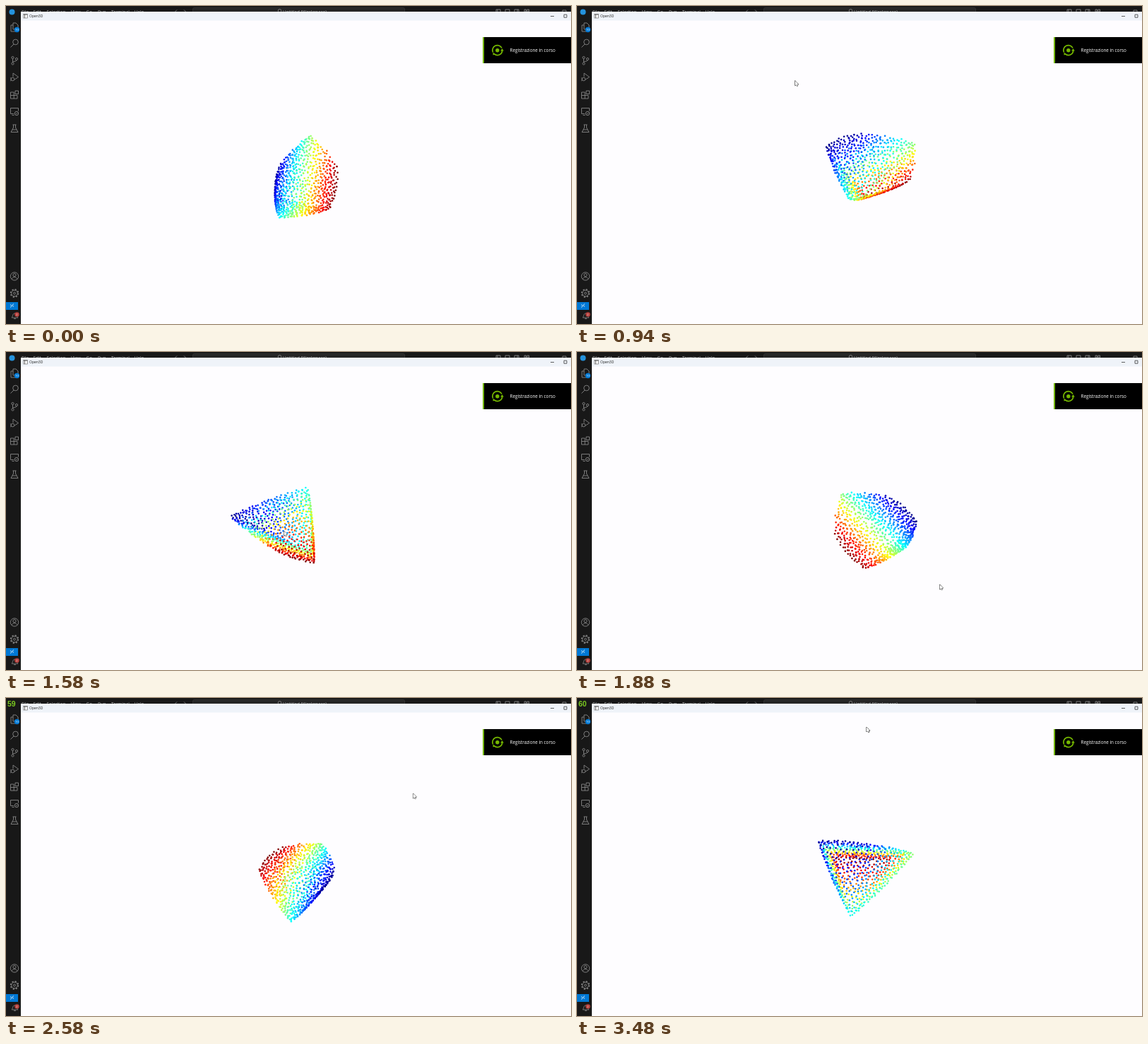
These frames come from a looping animation (800 by 450 pixels, 3.51 s). An HTML page with a canvas:

```html
<!DOCTYPE html>
<html lang="it">
<head>
<meta charset="utf-8">
<title>Open3D</title>
<style>
html, body { margin: 0; width: 100%; height: 100%; overflow: hidden; background: #181818; }
svg, canvas { position: absolute; left: 0; top: 0; width: 800px; height: 450px; }
text { font-family: "Open Sans", "Noto Sans", sans-serif; }
.menu { font-size: 6.4px; fill: #b4b4b4; }
.line { fill: none; stroke: #868686; stroke-width: .9; }
#fps { font: bold 10.5px "Liberation Sans", Arial, sans-serif; fill: #7ac820; }
</style>
</head>
<body>
<svg viewBox="0 0 800 450">
  <rect width="800" height="450" fill="#181818"/>
  <g class="menu">
    <text x="22" y="10.7">File</text><text x="38.5" y="10.7">Edit</text>
    <text x="57.5" y="10.7">Selection</text><text x="92" y="10.7">View</text>
    <text x="113.5" y="10.7">Go</text><text x="130" y="10.7">Run</text>
    <text x="149" y="10.7">Terminal</text><text x="181.5" y="10.7">Help</text>
  </g>
  <path class="line" d="M242 5.5l-3 3h5M252 5.5l3 3h-5"/>
  <rect x="264.5" y="2.5" width="300" height="11" rx="2" fill="#252525" stroke="#3b3b3b" stroke-width=".7"/>
  <circle class="line" cx="387.5" cy="6.8" r="2.3"/>
  <text class="menu" x="392" y="10.7">Untitled (Workspace)</text>
  <path class="line" d="M694 5h6v7h-6zM696 5v7M707 5h6v7h-6zM720 5h6v7h-6zM724 5v7M734 5h2.5v3h-2.5zM738 5h2.5v3h-2.5zM769 9h5M788 6h5v5h-5z"/>
  <circle id="logo" cx="8.5" cy="8.5" r="4" fill="#2492dc"/>
  <text id="fps" x="2" y="12"></text>

  <g class="line">
    <path d="M10 24h4l3 3v6h-7zM10 27h-3v9h7v-3"/>
    <circle cx="13.5" cy="51" r="3.8"/><path d="M11 54l-4.5 4.5"/>
    <circle cx="9.5" cy="73" r="1.6"/><circle cx="9.5" cy="81.5" r="1.6"/><circle cx="15" cy="75" r="1.6"/>
    <path d="M9.5 74.6v5.3M15 76.6c0 2.5-5.5 1-5.5 3.3"/>
    <path d="M10 100v-5l7.5 5.5-6 4"/><circle cx="9.5" cy="103.5" r="2.3"/><path d="M6 101.5l1.5 1M6 106l1.5-1M6 103.8h1.2"/>
    <path d="M6.5 122h4.7v9H6.5zM11.2 126.5H16v4.5h-4.8M6.5 126.5h4.7M13 120h4.5v4.5H13z"/>
    <path d="M11 152.5H6.5v-8h11v4M8.5 154.5h3"/><circle cx="15" cy="152" r="2.7"/><path d="M13.8 152l.9.9 1.5-1.8"/>
    <path d="M9.5 168h5M10.5 168v4L7 178.5h10l-3.5-6.5v-4M9 175h6"/>
    <circle cx="12" cy="382.5" r="5.7"/><circle cx="12" cy="380.7" r="2.1"/><path d="M8.2 386.7c.8-4 6.8-4 7.6 0"/>
    <circle cx="12" cy="406.5" r="4.3"/><circle cx="12" cy="406.5" r="1.5"/>
    <circle cx="12" cy="406.5" r="5.4" stroke-width="1.6" stroke-dasharray="2.12"/>
    <path d="M8 441c2-1.5 1-6 4.5-6s2.5 4.5 4.5 6zM11 442.5h3"/>
  </g>
  <circle cx="15.5" cy="33.5" r="3.7" fill="#0078d4"/>
  <text x="15.5" y="35.1" font-size="4.3" text-anchor="middle" fill="#fff">10</text>
  <rect y="419" width="17" height="11" fill="#0078d4"/>
  <path d="M6 422.5l2.3 2-2.3 2M11 421.5l-2.3 2 2.3 2" fill="none" stroke="#fff" stroke-width=".8"/>
  <circle cx="15.5" cy="436.5" r="3.3" fill="#b5403c"/>
  <text x="15.5" y="438" font-size="4" text-anchor="middle" fill="#fff">2</text>

  <rect x="21" y="8" width="779" height="442" fill="#fefdff"/>
  <rect x="21" y="8" width="779" height="12.5" fill="#eff3f9"/>
  <rect x="24.8" y="11.5" width="5.5" height="5.5" fill="#fff" stroke="#555" stroke-width=".6"/>
  <path d="M25 12.2h5M26.5 12v5" stroke="#555" stroke-width=".8"/>
  <text x="33" y="16.2" font-size="5" fill="#222">Open3D</text>
  <path d="M771 14.5h5M790 12.2h4v4h-4z" fill="none" stroke="#222" stroke-width=".7"/>

  <rect x="675" y="44" width="125" height="37" fill="#000"/>
  <rect x="675" y="44" width="2" height="37" fill="#76b900"/>
  <g fill="none" stroke="#76b900" stroke-width="1.7">
    <path d="M689.5 65.5a6.8 6.8 0 0 1 12.5-6M702.6 62.5a6.8 6.8 0 0 1-11.5 5.2"/>
    <circle cx="695.8" cy="62.8" r="2.7" fill="#76b900" stroke="none"/>
    <path d="M700 63.5h4.8l-2.3-3.2zM689.5 69.5v-4l3.5 3z" fill="#76b900" stroke="none"/>
  </g>
  <text x="713.5" y="65.3" font-size="6.3" fill="#fff">Registrazione in corso</text>
</svg>
<canvas width="800" height="450"></canvas>
<script>
const LOOP = 3510, STEP = 30, RAD = Math.PI / 180, EYE = 700;
const ctx = document.querySelector('canvas').getContext('2d');
const logo = document.getElementById('logo'), fps = document.getElementById('fps');
const arrow = new Path2D('M0 0v7l1.6-1.5 1.1 2.3 1.1-.5-1.1-2.2h2.2z');

const dot = (a, b) => a[0] * b[0] + a[1] * b[1] + a[2] * b[2];
const cross = (a, b) => [a[1] * b[2] - a[2] * b[1], a[2] * b[0] - a[0] * b[2], a[0] * b[1] - a[1] * b[0]];
const add = (a, b, k = 1) => a.map((v, i) => v + b[i] * k);
const sum = (pts, w) => pts.reduce((s, p, i) => add(s, p, w[i]), [0, 0, 0]);

// Rounded base outline and, last, the apex
const solid = [[0, 0, 0], [55, -18, 0], [140, 0, 0], [123, 59, 0], [54, 84, 0], [66, 43, -91]];
const base = [[0, 1, 4], [1, 3, 4], [1, 2, 3]];
const sides = [0, 1, 2, 3, 4].map(i => [5, i, (i + 1) % 5]);
const pivot = [84, 38, -36], core = [73, 28, -15], height = [.0036, .0096, .0029];

// A mouse drag turns the solid: roll, tilt and spin in degrees
const drag = [
  { t: 0, turn: [47, 44, -101], at: [420, 258], mouse: [480, 260] },
  { t: 940, turn: [37, 32, -42], at: [421, 244], mouse: [307, 104] },
  { t: 1300, turn: [142, 29, -142], at: [407, 235], mouse: [289.5, 187.5] },
  { t: 1880, turn: [291, 145, -280], at: [423, 259], mouse: [521.5, 334] },
  { t: 2300, turn: [360, 158, -235], at: [408, 262], mouse: [679.5, 219.5] },
  { t: 2850, turn: [358, 81, -311], at: [408, 260], mouse: [477, 53.5] },
  { t: 3480, turn: [362, 80, -338], at: [409, 256], mouse: [410, 41] }
];

function pose(t) {
  const i = Math.max(1, drag.findIndex(k => k.t >= t)), a = drag[i - 1], b = drag[i];
  const u = (t - a.t) / (b.t - a.t);
  const tween = key => a[key].map((v, j) => v + (b[key][j] - v) * u);
  return { turn: tween('turn'), at: tween('at'), mouse: tween('mouse') };
}

function rotate([x, y], angle) {
  const c = Math.cos(angle * RAD), s = Math.sin(angle * RAD);
  return [c * x - s * y, s * x + c * y];
}

function project([x, y, z], { turn: [roll, tilt, spin], at }) {
  [x, y] = rotate([x, y], spin);
  [y, z] = rotate([y, z], tilt);
  [x, y] = rotate([x, y], roll);
  const k = EYE / (EYE + z);
  return { x: at[0] + x * k, y: at[1] + y * k, z };
}

let seed = 7;
function rand() {
  seed = (seed * 1664525 + 1013904223) % 4294967296;
  return seed / 4294967296;
}

function jet(v) {
  const c = k => Math.round(255 * Math.min(1, Math.max(0, 1.5 - Math.abs(4 * v - k))));
  return `rgb(${c(3)},${c(2)},${c(1)})`;
}

// Evenly spread points on slightly swollen faces
function scatter(gap, swell) {
  const faces = [...base, ...sides].map(f => f.map(i => solid[i]));
  const area = faces.map(([a, b, c]) => Math.hypot(...cross(add(b, a, -1), add(c, a, -1))));
  const total = area.reduce((s, v) => s + v), out = [];
  for (let n = 0; n < 9000; n++) {
    let pick = rand() * total, f = 0;
    while (f < faces.length - 1 && pick > area[f]) pick -= area[f++];
    const r = Math.sqrt(rand()), s = rand();
    const w = [1 - r, r * (1 - s), r * s];
    const flat = sum(faces[f], w);
    const bend = swell * 4 * (w[0] * w[1] + w[1] * w[2] + w[2] * w[0]);
    const pos = add(flat, add(flat, core, -1), bend);
    if (out.every(o => Math.hypot(...add(o.flat, flat, -1)) > gap))
      out.push({ flat, pos: add(pos, pivot, -1), color: jet(dot(height, flat)) });
  }
  return out;
}
const cloud = scatter(4.5, .07);

function drawCloud(view) {
  const dots = cloud.map(p => ({ ...project(p.pos, view), color: p.color }));
  dots.sort((a, b) => b.z - a.z);
  for (const { x, y, color } of dots) {
    ctx.fillStyle = color;
    ctx.beginPath();
    ctx.arc(x, y, 1.3, 0, 7);
    ctx.fill();
  }
}

function drawMouse([x, y]) {
  ctx.save();
  ctx.translate(x, y);
  ctx.strokeStyle = '#111';
  ctx.stroke(arrow);
  ctx.fillStyle = '#fff';
  ctx.fill(arrow);
  ctx.restore();
}

let last = -1;
function frame(now) {
  const t = Math.floor((now % LOOP) / STEP) * STEP;
  if (t !== last) {
    last = t;
    const view = pose(t);
    ctx.clearRect(0, 0, 800, 450);
    drawCloud(view);
    if (t >= 300) drawMouse(view.mouse);
    fps.textContent = t < 2500 ? '' : t < 3390 ? '59' : '60';
    logo.style.display = t < 2500 ? '' : 'none';
  }
  requestAnimationFrame(frame);
}
frame(0);
</script>
</body>
</html>
```
